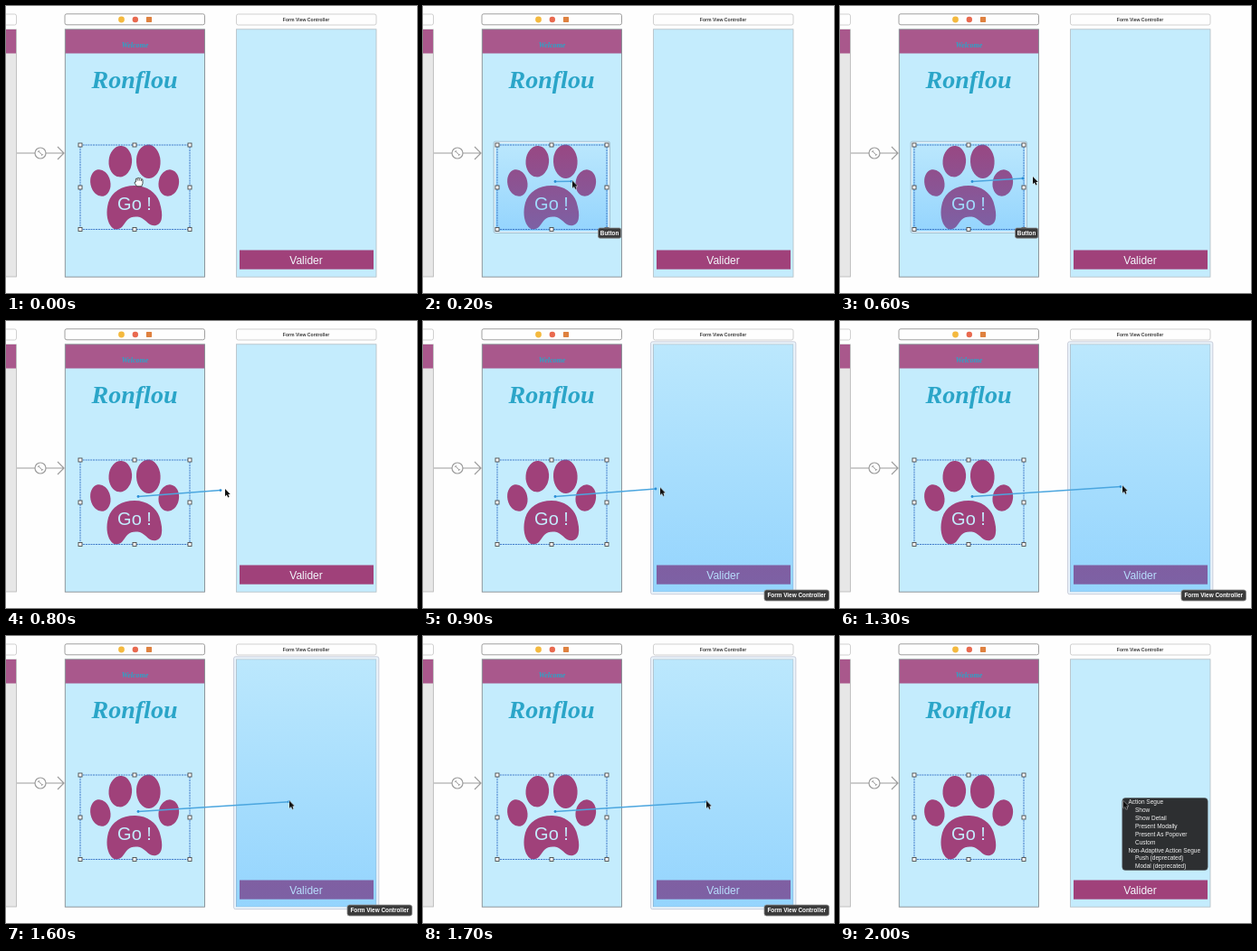
An HTML page that plays this animation: 454 px wide and 318 px high, repeating every 2.1 s.

```html
<!DOCTYPE html>
<html lang="fr">
<head>
<meta charset="utf-8">
<title>Storyboard segue</title>
<style>
  html, body { margin: 0; width: 100%; height: 100%; overflow: hidden; background: #fefefe; }
  svg { display: block; width: 454px; height: 318px; }
  text { font-family: "Liberation Sans", Arial, sans-serif; }
  .mid { text-anchor: middle; }
  .bold { font-weight: bold; }
  .script { font: italic bold 8px "Liberation Serif", serif; fill: #2aa5c8; }
  .plum { fill: #a0417a; }
  .nav { fill: #a9588c; }
  .sky { fill: #c4ecfd; }
  .bar { fill: #fefefe; stroke: #c4c4c4; stroke-width: .8; }
  .tip rect { fill: #3b3b3b; stroke: #8b8b8b; stroke-width: .8; }
  .tip text { fill: #fff; font-size: 6.4px; }
  .menu text { fill: #f4f4f4; font-size: 6.5px; }
  .handles rect { fill: #fff; stroke: #4a4a4a; stroke-width: .9; }

  .anim { animation: 2.1s step-end infinite; }
  .hand { animation-name: hand; }
  .over-button { animation-name: over-button; }
  .over-form { animation-name: over-form; }
  .menu { animation-name: menu; }
  .wire { animation-name: wire; }
  .arrow { animation-name: arrow; }

  @keyframes hand { 0% { visibility: visible } 4.76%, to { visibility: hidden } }
  @keyframes over-button {
    0%, 33.33%, to { visibility: hidden }
    4.76% { visibility: visible }
  }
  @keyframes over-form {
    0%, 85.71%, to { visibility: hidden }
    42.85% { visibility: visible }
  }
  @keyframes menu { 0% { visibility: hidden } 90.47%, to { visibility: visible } }
  @keyframes wire {
    0% { visibility: hidden; d: path("M146 194.5L147 194.5") }
    4.76% { visibility: visible; d: path("M146 194.5L150 194.5") }
    9.52% { d: path("M146 194.5L164 194.3") }
    14.28% { d: path("M146 194.5L180 193.4") }
    19.04% { d: path("M146 194.5L190 192.4") }
    23.8% { d: path("M146 194.5L196 191.8") }
    28.57% { d: path("M146 194.5L202 191") }
    33.33% { d: path("M146 194.5L217 189.5") }
    38.09% { d: path("M146 194.5L237 187.6") }
    42.85% { d: path("M146 194.5L257 186") }
    47.61% { d: path("M146 194.5L277 184.6") }
    52.38% { d: path("M146 194.5L293.5 183.5") }
    57.14% { d: path("M146 194.5L305 183.5") }
    61.9% { d: path("M146 194.5L310 183.6") }
    66.66% { visibility: visible; d: path("M146 194.5L312.5 183.7") }
    90.47%, to { visibility: hidden; d: path("M146 194.5L312.5 183.7") }
  }
  @keyframes arrow {
    0% { visibility: hidden; transform: translate(147px, 194px) }
    4.76% { visibility: visible; transform: translate(151px, 194px) }
    9.52% { transform: translate(165px, 193.5px) }
    14.28% { transform: translate(182px, 192.5px) }
    19.04% { transform: translate(193px, 191.5px) }
    23.8% { transform: translate(202px, 190.3px) }
    28.57% { transform: translate(213px, 189px) }
    33.33% { transform: translate(227px, 187.5px) }
    38.09% { transform: translate(242px, 186px) }
    42.85% { transform: translate(262px, 184.5px) }
    47.61% { transform: translate(282px, 183px) }
    52.38% { transform: translate(298.5px, 182px) }
    57.14% { transform: translate(308px, 182px) }
    61.9% { transform: translate(312px, 182.3px) }
    66.66%, to { visibility: visible; transform: translate(313px, 182.5px) }
  }
</style>
</head>
<body>
<svg viewBox="0 0 454 318">
  <defs>
    <linearGradient id="glow" x2="0" y2="1">
      <stop stop-color="#33a4fe" stop-opacity=".06"/>
      <stop offset="1" stop-color="#33a4fe" stop-opacity=".33"/>
    </linearGradient>
    <marker id="dot" viewBox="-2 -2 4 4" markerWidth="4" markerHeight="4" markerUnits="userSpaceOnUse">
      <circle r="1.4" fill="#2b8fd6"/>
    </marker>
  </defs>

  <!-- previous scene and its link -->
  <rect class="bar" x="-20" y="9" width="31.5" height="12" rx="2"/>
  <rect x="-5" y="26" width="16.5" height="274" fill="#e7e7e7" stroke="#b5b5b5" stroke-width=".8"/>
  <rect class="nav" x="0" y="26" width="11" height="26.5"/>
  <g fill="none" stroke="#9c9c9c" stroke-width="1.2">
    <path d="M12 163H64M57 156L64 163L57 170"/>
    <circle cx="38" cy="163" r="6" fill="#fefefe"/>
    <path d="M36 161L40 165" stroke-width="1"/>
    <path d="M35 161.8L36.8 160M39.2 166L41 164.2" stroke-width="1"/>
  </g>

  <!-- welcome scene -->
  <rect class="bar" x="65" y="8.8" width="154.5" height="12" rx="2" style="stroke:#888"/>
  <circle cx="127.5" cy="15" r="3.4" fill="#f4b93e"/>
  <circle cx="142.8" cy="15" r="3.2" fill="#e9694f"/>
  <rect x="154.9" y="11.9" width="6.2" height="6.2" rx=".8" fill="#df813f"/>
  <rect class="sky" x="65.3" y="26" width="154.2" height="274"/>
  <rect class="nav" x="65.3" y="26" width="154.2" height="26.5"/>
  <rect x="65.3" y="25.8" width="154.2" height="274.4" fill="none" stroke="#858d92" stroke-width=".9"/>
  <text class="script mid" x="142.5" y="46">Welcome</text>
  <text class="script mid" x="142" y="91" style="font-size:28px">Ronflou</text>

  <g class="plum">
    <ellipse cx="126.3" cy="172.2" rx="12.8" ry="17.2" transform="rotate(4 126.3 172.2)"/>
    <ellipse cx="157.3" cy="172.3" rx="13.3" ry="18.7" transform="rotate(-3 157.3 172.3)"/>
    <ellipse cx="104.3" cy="196" rx="11" ry="15" transform="rotate(-12 104.3 196)"/>
    <ellipse cx="179.8" cy="196" rx="11.2" ry="14.8" transform="rotate(10 179.8 196)"/>
    <path d="M142 199C156 199 166 207 169.5 217C172 225 172.8 231 171.8 236C170.5 242.5 165 244.5 160 242.5C155 240 152.5 234.5 145.5 233.5C136 232.5 133 238 129.5 243C126 248.5 119 249 115.5 243.5C111 237 110.5 227 113 218C116.5 206 128 199 142 199Z"/>
  </g>
  <text class="mid sky" x="142" y="225.6" font-size="20">Go !</text>

  <g class="anim over-button">
    <rect x="79" y="151" width="126.5" height="99.5" fill="url(#glow)"/>
    <rect x="79.3" y="151.3" width="126" height="99" rx="1" fill="none" stroke="#f4fbff" stroke-opacity=".85" stroke-width="1.5"/>
    <rect x="78.2" y="150.2" width="128.2" height="101.2" rx="1.5" fill="none" stroke="#93a9b8" stroke-width=".7"/>
  </g>
  <rect x="82" y="154" width="121" height="93.5" fill="none" stroke="#316fc4" stroke-width=".9" stroke-dasharray="2 .8"/>
  <g class="handles">
    <rect x="80" y="152" width="4" height="4"/>
    <rect x="140" y="152" width="4" height="4"/>
    <rect x="201" y="152" width="4" height="4"/>
    <rect x="80" y="199" width="4" height="4"/>
    <rect x="201" y="199" width="4" height="4"/>
    <rect x="80" y="245.5" width="4" height="4"/>
    <rect x="140" y="245.5" width="4" height="4"/>
    <rect x="201" y="245.5" width="4" height="4"/>
  </g>
  <g class="tip anim over-button">
    <rect x="193.5" y="246" width="25.3" height="11.2" rx="2"/>
    <text class="mid bold" x="206.1" y="253.9">Button</text>
  </g>

  <!-- form scene -->
  <rect class="bar" x="254.5" y="9" width="154.5" height="12" rx="2"/>
  <text class="mid bold" x="331.5" y="16.9" font-size="5.1" fill="#3c3c3c">Form View Controller</text>
  <rect class="sky" x="254.5" y="25.8" width="154.5" height="274.4" stroke="#b3bdc3" stroke-width=".8"/>
  <rect class="plum" x="258" y="270.5" width="148" height="21.2"/>
  <text class="mid" x="331.5" y="285.5" font-size="12" fill="#f3f7fc">Valider</text>
  <g class="anim over-form">
    <rect x="254" y="25.4" width="155.5" height="275" fill="url(#glow)"/>
    <rect x="253" y="24.3" width="157.4" height="277" rx="1" fill="none" stroke="#e9f4fc" stroke-width="2"/>
    <rect x="251.6" y="22.9" width="160.2" height="279.8" rx="2" fill="none" stroke="#b9bfd0" stroke-width=".8"/>
    <g class="tip">
      <rect x="377" y="298" width="71.5" height="12" rx="2.5"/>
      <text class="mid bold" x="412.7" y="306.3">Form View Controller</text>
    </g>
  </g>

  <path class="anim wire" d="M146 194.5L147 194.5" fill="none" stroke="#4ba6df" stroke-width="1.5" marker-start="url(#dot)" marker-end="url(#dot)"/>

  <g class="anim menu">
    <rect x="311.8" y="179.5" width="94.4" height="80" rx="3.5" fill="#2d2f31" stroke="#5c6468" stroke-width=".6"/>
    <text x="318.5" y="186.3">Action Segue</text>
    <text x="326" y="195.2">Show</text>
    <text x="326" y="204.1">Show Detail</text>
    <text x="326" y="212.9">Present Modally</text>
    <text x="326" y="221.8">Present As Popover</text>
    <text x="326" y="230.6">Custom</text>
    <text x="318.5" y="239.5">Non-Adaptive Action Segue</text>
    <text x="326" y="248.3">Push (deprecated)</text>
    <text x="326" y="257.2">Modal (deprecated)</text>
  </g>

  <path class="anim hand" d="M144.6 199.8L142.2 196.4Q141.6 194.6 143.4 195V192.2Q143.4 190.6 145 191.2Q146 189.8 147.2 191Q148.6 190.2 149.4 191.6Q151 191.4 151 193V196.6L149.8 199.8ZM145.2 191.6V193.6M147.2 191.4V193.6M149.3 192V194" fill="#fff" stroke="#222" stroke-width=".8" stroke-linejoin="round"/>
  <path class="anim arrow" d="M0 0V8.2L1.9 6.5L3.2 9.5L4.6 8.9L3.4 6H5.8Z" fill="#111" stroke="#fff" stroke-width=".8" paint-order="stroke"/>
</svg>
</body>
</html>
```
